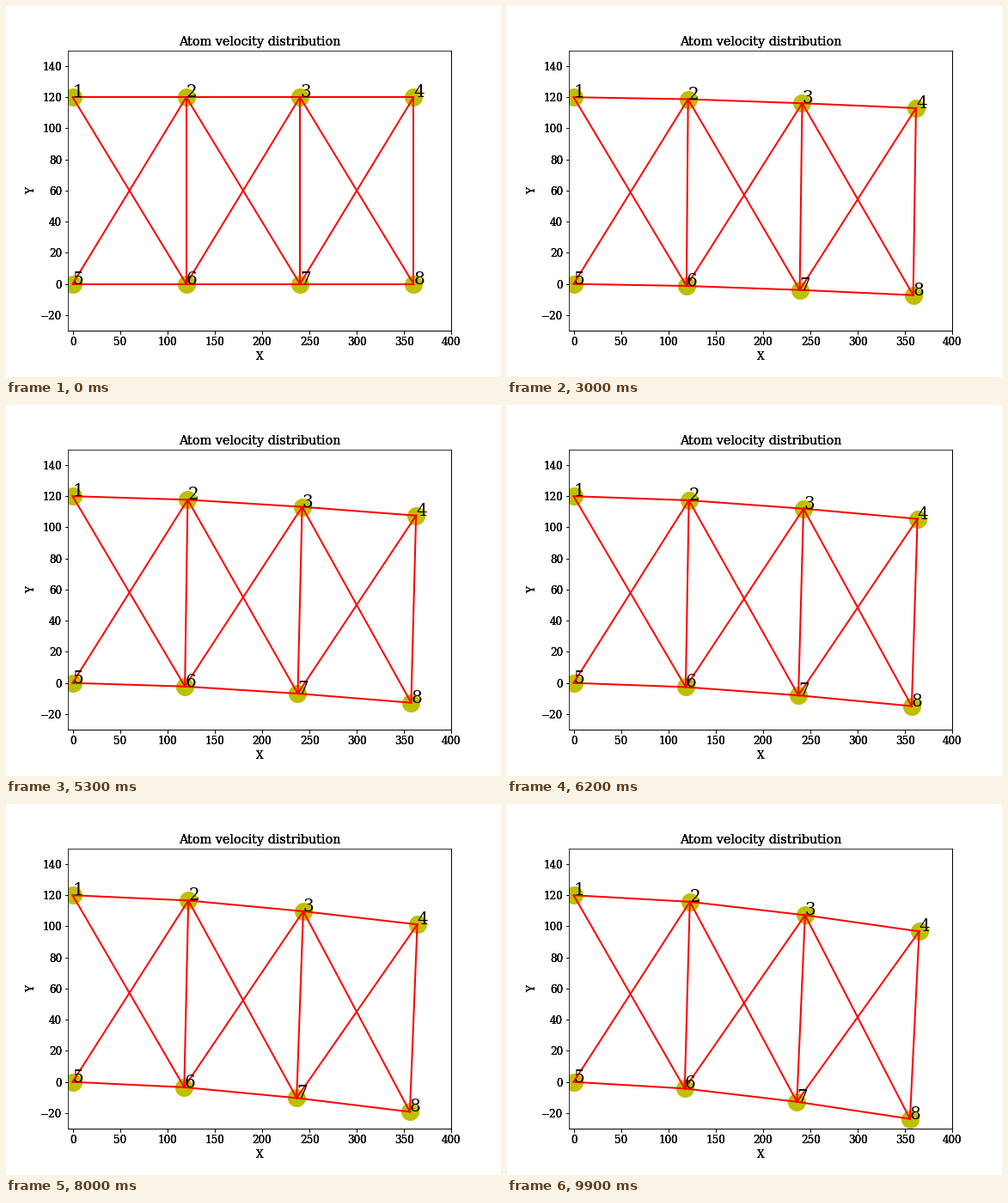
These frames come from a looping animation (576 by 432 pixels, 10000 ms). A matplotlib script:

```python
import numpy as np
import matplotlib.pyplot as plt
from matplotlib.animation import FuncAnimation

plt.rcParams.update({"font.family": "DejaVu Serif", "font.size": 12})

FRAMES = 100
LOAD_STEP = 9.1e-5  # end load per frame, divided by EA

# Cantilever truss: nodes 1-4 on top, 5-8 below, left side fixed
nodes = np.array([(x, y) for y in (120, 0) for x in (0, 120, 240, 360)], float)
bars = [(r + k, r + k + 1) for r in (0, 4) for k in range(3)]
bars += [(k, k + 4) for k in (1, 2, 3)]
bars += [(k, k + 5) for k in range(3)] + [(k + 4, k + 1) for k in range(3)]


def unit_displacement():
    """Node displacements for a unit downward load at the lower right node."""
    n = nodes.size
    K = np.zeros((n, n))
    for a, b in bars:
        d = nodes[b] - nodes[a]
        length = np.hypot(*d)
        c = d / length
        g = np.concatenate([-c, c])
        dof = [2 * a, 2 * a + 1, 2 * b, 2 * b + 1]
        K[np.ix_(dof, dof)] += np.outer(g, g) / length
    free = [i for i in range(n) if i // 2 not in (0, 4)]
    force = np.zeros(n)
    force[-1] = -1
    u = np.zeros(n)
    u[free] = np.linalg.solve(K[np.ix_(free, free)], force[free])
    return u.reshape(-1, 2)


def make_axes(fig):
    ax = fig.add_axes([0.125, 0.125, 0.775, 0.755])
    ax.set(xlim=(-5, 400), ylim=(-30, 150), xlabel="X", ylabel="Y",
           xticks=np.arange(0, 401, 50), yticks=np.arange(-20, 141, 20))
    ax.set_title("Atom velocity distribution")
    return ax


fig = plt.figure(figsize=(8, 6), dpi=72, facecolor="white")
# Stacked axes give the labels their heavy, overprinted look
for _ in range(3):
    ax = make_axes(fig)

shift = unit_displacement() * LOAD_STEP
dots, = ax.plot([], [], "o", color=(0.75, 0.75, 0), markersize=20)
lines = [ax.plot([], [], color="red", lw=2)[0] for _ in bars]
labels = [ax.text(x, y, str(i + 1), fontsize=20)
          for i, (x, y) in enumerate(nodes)]


def update(i):
    pos = nodes + shift * i
    dots.set_data(pos[:, 0], pos[:, 1])
    for line, bar in zip(lines, bars):
        line.set_data(*pos[list(bar)].T)
    for label, p in zip(labels, pos):
        label.set_position(p)
    return [dots, *lines, *labels]


anim = FuncAnimation(fig, update, frames=FRAMES, interval=100,
                     init_func=lambda: update(0), repeat=True,
                     repeat_delay=0, blit=False)
plt.show()
```
